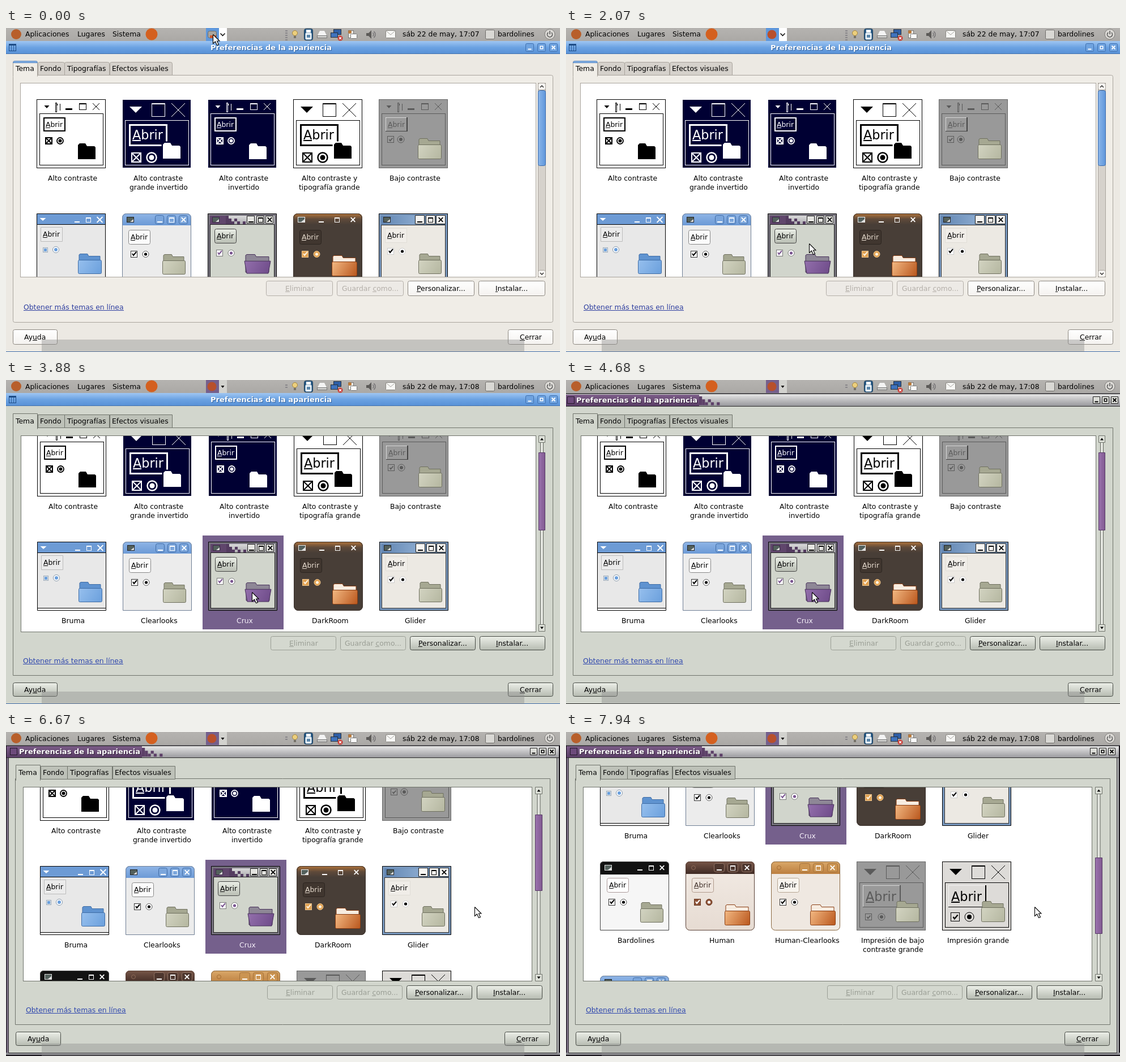
An HTML page with a canvas for the animation above (8 s loop, 978x573 px).

```html
<!DOCTYPE html>
<html lang="es">
<head>
<meta charset="utf-8">
<title>Preferencias de la apariencia</title>
<style>
html, body { margin: 0; width: 100%; height: 100%; overflow: hidden; background: #ece9e3; }
canvas { display: block; }
</style>
</head>
<body>
<canvas id="stage" width="978" height="573"></canvas>
<script>
const g = document.getElementById('stage').getContext('2d');
const LOOP = 8000;
// front, highlight, outline, back
const TAN = ['#b4b69f', '#d3d4c2', '#6f705f', '#a6a892'], BLUE = ['#6a9fdc', '#97c0ee', '#3f6da6', '#5f93d0'];
const ORANGE = ['#b9561c', '#f3b983', '#8a3d12', '#f7ece0'], PURPLE = ['#6d4a88', '#9470ad', '#47305a', '#8e8796'];

// ---- drawing helpers ----
const rect = (x, y, w, h, c) => { g.fillStyle = c; g.fillRect(x, y, w, h); };
const box = (x, y, w, h, c, lw = 1) => {
  g.strokeStyle = c; g.lineWidth = lw;
  g.strokeRect(x + lw / 2, y + lw / 2, w - lw, h - lw);
};
const trace = p => {
  g.beginPath();
  for (let i = 0; i < p.length; i += 2) g.lineTo(p[i], p[i + 1]);
};
const line = (c, lw, ...p) => { trace(p); g.strokeStyle = c; g.lineWidth = lw; g.stroke(); };
const poly = (c, ...p) => { trace(p); g.closePath(); g.fillStyle = c; g.fill(); };
const disc = (x, y, r, fill, edge, lw = 1) => {
  g.beginPath(); g.arc(x, y, r, 0, 7);
  if (fill) { g.fillStyle = fill; g.fill(); }
  if (edge) { g.strokeStyle = edge; g.lineWidth = lw; g.stroke(); }
};
const round = (x, y, w, h, r, fill, edge) => {
  g.beginPath(); g.roundRect(x + .5, y + .5, w - 1, h - 1, r);
  if (fill) { g.fillStyle = fill; g.fill(); }
  if (edge) { g.strokeStyle = edge; g.lineWidth = 1; g.stroke(); }
};
const fade = (x1, y1, x2, y2, ...cols) => {
  const f = g.createLinearGradient(x1, y1, x2, y2);
  cols.forEach((c, i) => f.addColorStop(i / (cols.length - 1), c));
  return f;
};
const down = (y, h, ...cols) => fade(0, y, 0, y + h, ...cols);
const tri = (x, y, w, h, c) => poly(c, x - w / 2, y, x + w / 2, y, x, y + h);
const cross = (x, y, r, c, lw = 1) => {
  line(c, lw, x - r, y - r, x + r, y + r);
  line(c, lw, x + r, y - r, x - r, y + r);
};
const tick = (x, y, c, k = 1) =>
  line(c, 2 * k, x - 3 * k, y, x - k, y + 3 * k, x + 4 * k, y - 3 * k);

// An underscore marks the underlined letter.
function text(s, x, y, c = '#000', { size = 12.4, align = 'left', bold = false } = {}) {
  const at = s.indexOf('_');
  s = s.replace('_', '');
  g.font = `${bold ? 'bold ' : ''}${size}px "DejaVu Sans", sans-serif`;
  const width = g.measureText(s).width;
  if (align === 'center') x -= width / 2;
  x = Math.round(x);
  y = Math.round(y);
  g.fillStyle = c;
  g.fillText(s, x, y);
  if (at >= 0) {
    const a = g.measureText(s.slice(0, at)).width, w = g.measureText(s[at]).width;
    g.fillRect(Math.round(x + a), y + 1, Math.round(w), size > 20 ? 2 : 1);
  }
}

// ---- theme previews (drawn at the tile's own corner) ----
function folder(x, y, w, h, tint) {
  const [low, high, edge, back] = tint, top = y + h * .3;
  g.beginPath();
  g.moveTo(x + 2, y + h - 2); g.lineTo(x + 2, y + 2); g.lineTo(x + 4, y + .5);
  g.lineTo(x + w * .4, y + .5); g.lineTo(x + w * .45, y + 4.5); g.lineTo(x + w - 3, y + 4.5);
  g.lineTo(x + w - 3, y + h - 2); g.closePath();
  g.fillStyle = back; g.fill();
  g.strokeStyle = edge; g.lineWidth = 1; g.stroke();
  const paint = fade(x, top, x + w, y + h, high, low);
  if (tint === PURPLE) {
    const p = [x, top + 2, x + w, top + 2, x + w - 4, y + h, x + 4, y + h, x, top + 2];
    poly(paint, ...p);
    line(edge, 1, ...p);
  } else round(x, Math.round(top), w, Math.round(y + h - top), 2, paint, edge);
}

function flatFolder(x, y, c, rim) {
  g.lineJoin = 'round';
  trace([x, y + 28, x, y + 3, x + 3, y, x + 13, y, x + 16, y + 5, x + 29, y + 5, x + 31, y + 7, x + 31, y + 28]);
  g.closePath();
  if (rim) { g.strokeStyle = rim; g.lineWidth = 5; g.stroke(); }
  g.fillStyle = c; g.fill();
  g.lineJoin = 'miter';
}

function bevel(x, y, w, h, dark) {
  rect(x, y, w, 1, '#fff9'); rect(x, y, 1, h, '#fff9');
  rect(x, y + h - 1, w, 1, dark); rect(x + w - 2, y, 2, h, dark);
}

function contrast(bg, fg, big, soft) {
  rect(0, 0, 122, 122, bg);
  box(0, 0, 122, 122, soft && fg !== '#000' ? '#666' : fg);
  if (big) {
    tri(24, 13, 22, 11, fg);
    box(52, 7, 24, 24, fg); rect(52, 7, 24, 2, fg);
    cross(99, 19, 12, fg);
    box(5, 37, 113, 80, fg);
    if (soft) bevel(11, 42, 67, 39, fg); else box(12, 44, 68, 39, fg, 3);
    text('_Abrir', soft ? 16 : 18, soft ? 70 : 71, fg, { size: 22.3 });
  } else {
    tri(18, 11, 9, 5, fg);
    box(33, 6, 3, 17, fg); rect(41, 8, 1, 12, fg); rect(36, 8, 1, 3, fg);
    rect(51, 16, 12, 3, fg);
    box(75, 7, 13, 12, fg); rect(75, 7, 13, 2, fg);
    cross(105, 13, 6, fg);
    box(5, 25, 113, 92, fg);
    if (soft) bevel(12, 32, 39, 25, '#444'); else box(12, 32, 39, 25, fg, 2);
    text('_Abrir', 16, 49, fg);
  }
  if (soft) {
    const n = fg === '#000' ? 16 : 12, cy = big ? 98 : 71, cx = !big ? 39 : n > 12 ? 48 : 44;
    box(15, cy - n / 2, n, n, fg);
    tick(15 + n / 2, cy, fg, n / 14);
    disc(cx, cy, n / 2, null, fg);
    disc(cx, cy, n / 4, fg);
    folder(69, big ? 70 : 69, 42, 37, TAN);
  } else {
    const n = big ? 18 : 13, x = big ? 16 : 15, y = big ? 94 : 67;
    box(x, y, n, n, fg, 2);
    cross(x + n / 2, y + n / 2, n / 2 - 2, fg, 2);
    const cx = big ? 52 : 41.5, cy = y + n / 2;
    disc(cx, cy, big ? 8.5 : 5.5, null, fg, big ? 2.5 : 1.8);
    disc(cx, cy, big ? 4.5 : 3, fg);
    if (big) flatFolder(72, 77, fg, bg); else flatFolder(73, 78, fg);
  }
}

function windowTile(o) {
  const { bar, body, edge, h = 20, r = 0, ink = '#000', mark = '#000' } = o;
  const corners = o.low ? r : [r, r, 0, 0];
  g.save();
  g.beginPath(); g.roundRect(0, 0, 122, 122, corners); g.clip();
  rect(0, 0, 122, 122, body);
  rect(0, 0, 122, h, bar);
  if (o.extra) o.extra();
  g.restore();
  round(0, 0, 122, 122, corners, null, edge);
  if (!o.bruma && !o.dot) {
    rect(8, 6, 13, 10, o.rim || '#222'); rect(9, 7, 11, 8, '#53605c');
    poly('#ddd', 20, 10, 20, 15, 14, 15);
  }
  if (o.bruma) tri(11, 8, 11, 5, '#fff');
  if (o.dot) disc(14, 11, 3.5, null, o.dot);
  const [cx, pitch, w, fill, rim, glyph] = o.ctl;
  for (let i = 0; i < 3; i++) {
    const x = Math.round(cx + pitch * i), y = 11, n = Math.min(16, w);
    if (w) round(Math.round(x - w / 2), y - n / 2, w, n, o.square ? 0 : 3, fill, rim);
    if (i === 0) rect(x - 4, y + 3, 9, 2, glyph);
    if (i === 1) { box(x - 4, y - 4, 9, 9, glyph); rect(x - 4, y - 4, 9, 2, glyph); }
    if (i === 2) cross(x + .5, y, o.bruma ? 5 : 3.8, glyph, 1.8);
  }
  const bx = o.bx || 11, by = o.by || 29;
  round(bx, by, 39, 26, o.flat ? 0 : 3, o.btn, o.btnEdge);
  text('_Abrir', bx + 4, by + 17, ink);
  const cy = o.cy || 72;
  if (o.bruma) {
    box(11, 60, 9, 9, '#9ab'); rect(13, 62, 5, 5, BLUE[0]);
    disc(34, 64, 5.5, '#fff', '#89a'); disc(34, 64, 3, BLUE[0]);
  } else {
    rect(15, cy - 6, 12, 12, o.well || '#fff');
    box(15, cy - 6, 12, 12, o.box || '#333');
    tick(21, cy - 1, mark);
    disc(41.5, cy, 5.5, o.well || '#fff', o.box || '#555');
    disc(41.5, cy, 2.6, mark);
  }
  folder(...(o.at || [71, 72, 41, 36]), o.folder || TAN);
}

// Loose blocks that trail off a solid bar.
const steps = (x, y, k, c) =>
  [[0, 0, 3], [1, 1, 2], [2, 2, 1], [3, 1, 1], [4, 2, 1], [6, 2, 1]]
    .forEach(([a, b, n]) => rect(x + a * k, y + b * k, k, n * k, c));

const blueLook = () => windowTile({ bar: down(0, 21, '#8fb5e6', '#6c9ad6'), body: '#ececec', edge: '#6f7f95', h: 21,
  r: 7, ctl: [65.5, 21, 16, '#7ba6dc', '#416ca6', '#fff'], btn: '#fbfbfb', btnEdge: '#888' });

const tiles = [
  [['Alto contraste'], () => contrast('#fff', '#000')],
  [['Alto contraste', 'grande invertido'], () => contrast('#000033', '#fff', true)],
  [['Alto contraste', 'invertido'], () => contrast('#000033', '#fff')],
  [['Alto contraste y', 'tipografía grande'], () => contrast('#fff', '#000', true)],
  [['Bajo contraste'], () => contrast('#999', '#5a5a5a', false, true)],
  [['Bruma'], () => windowTile({ bar: '#6d9bd5', body: '#e8e8e8', edge: '#000', h: 19, bruma: true,
    ctl: [71, 20, 0, 0, 0, '#fff'], btn: '#ebebeb', btnEdge: '#bbb', flat: true, bx: 7, by: 24,
    folder: BLUE, at: [73, 71, 42, 36],
    extra() { rect(0, 19, 122, 1, '#000'); rect(0, 117, 122, 1, '#000'); rect(1, 118, 120, 3, '#fff'); } })],
  [['Clearlooks'], blueLook],
  [['Crux'], () => windowTile({ bar: down(0, 20, '#e6e6e6', '#a9a9ac'), body: '#d1d5cc',
    edge: '#000', square: true, rim: '#3a2a45', ctl: [76, 16.5, 14, '#e4e4e0', '#222', '#000'],
    btn: down(29, 26, '#e7ebe3', '#b4b9ae'), btnEdge: '#444', mark: '#7a5590', box: '#777', cy: 70, bx: 12, by: 27,
    folder: PURPLE, at: [65, 72, 46, 34],
    extra() {
      rect(0, 0, 32, 20, '#60466c'); steps(32, 4, 5, '#543c60');
      box(1, 1, 120, 120, '#75727c', 3); box(4, 19, 114, 99, '#222');
    } })],
  [['DarkRoom'], () => windowTile({ bar: down(0, 20, '#b0733a', '#5f4a3a', '#483e37'), body: '#483e37',
    edge: '#3a302a', r: 8, low: true, ctl: [49, 28, 0, 0, 0, '#fff'], rim: '#eee', btn: '#40362f',
    btnEdge: '#2c2520', ink: '#e8ddd0', well: '#e0a050', box: '#f0c890', mark: '#fff3df',
    folder: ORANGE, at: [68, 74, 45, 37] })],
  [['Glider'], () => windowTile({ bar: fade(0, 0, 122, 0, '#5f83b0', '#86a6cc', '#3d5874'), body: '#ece9e3',
    edge: '#000', square: true, ctl: [72, 18.5, 17, '#f6f5f2', '#222', '#000'], btn: '#f0ede8', btnEdge: '#e0ddd6',
    flat: true, box: '#ccc', by: 26, cy: 67, at: [70, 71, 41, 36],
    extra() { box(1, 1, 120, 120, '#7897bd', 3); box(4, 20, 114, 98, '#333'); } })],
  [['Bardolines'], () => windowTile({ bar: '#121212', body: '#f6f6f6', edge: '#444', h: 23, r: 6, rim: '#ddd',
    ctl: [70, 19.5, 0, 0, 0, '#fff'], btn: '#fff', btnEdge: '#a99', bx: 12 })],
  [['Human'], () => windowTile({ bar: down(0, 22, '#775648', '#3f2a24'), body: down(22, 100, '#f0e8e1', '#e6dbd2'),
    edge: '#5b4238', h: 22, r: 7, low: true, dot: '#8d6a58', ctl: [58.5, 24.5, 19, '#4d362e', '#947565', '#fff'],
    btn: '#efe6df', btnEdge: '#b09a8c', ink: '#40302a', well: '#8d5236', box: '#6a3a24', mark: '#fff',
    folder: ORANGE, at: [69, 76, 45, 37] })],
  [['Human-Clearlooks'], () => windowTile({ bar: down(0, 22, '#daa869', '#bc7f40'), body: '#efe8e1',
    edge: '#8a6842', h: 22, r: 7, low: true, dot: '#a56c32', ctl: [58.5, 24.5, 19, '#cb9452', '#a4713a', '#fff'],
    btn: '#f8f4ee', btnEdge: '#b5a592', folder: ORANGE, at: [69, 76, 45, 37] })],
  [['Impresión de bajo', 'contraste grande'], () => contrast('#999', '#5a5a5a', true, true)],
  [['Impresión grande'], () => contrast('#dddbd8', '#000', true, true)],
  [[], blueLook],
];
const ROWS = [0, 202, 387, 589];

// ---- window layouts ----
const soft = {
  body: '#ece9e3', pane: '#f0ede7', edge: '#a9a49d', tabOff: '#d5d1cb', dim: '#b3aea8', link: '#2f3fa0',
  pick: '#86abd9', bar: ['#8db7ea', '#5d95da'], trough: '#d6d2cc', r: 3,
  tab: [12, 58], note: [12, 83, 954, 438], list: [25, 97, 911, 344], at: [54, 126],
  scroll: [939, 97, 14, 344], slide: [.41, 134], btn: [459, 447, 118, 27, 125], url: [31, 498],
  foot: [12, 533, 79, 27, 886],
};
const crux = {
  body: '#d2d6cd', pane: '#d2d6cd', edge: '#6f736b', tabOff: '#bdc1b8', dim: '#9a9e95', link: '#3048ae',
  pick: '#75608c', bar: ['#9c74b0', '#80598f'], trough: '#d2d6cd', r: 0,
  tab: [12, 59], note: [12, 84, 954, 439], list: [26, 98, 910, 348], at: [55, 128],
  scroll: [940, 98, 12, 347], slide: [.41, 138], btn: [467, 453, 116, 25, 123], url: [30, 501],
  foot: [12, 535, 79, 25, 886],
};
const framed = { ...crux,
  tab: [17, 58], note: [16, 82, 945, 436], list: [30, 97, 899, 344], at: [60, 127],
  scroll: [934, 97, 13, 344], slide: [.394, 135], btn: [461, 448, 116, 25, 123.2], url: [35, 496],
  foot: [17, 530, 80, 25, 880],
};

function button(s, x, y, w, h, k, off) {
  x = Math.round(x);
  const fill = k === soft ? (off ? '#edeae6' : down(y, h, '#fff', '#f4f2ef'))
    : off ? '#d4d8cf' : down(y, h, '#edf0e9', '#b5bab0');
  round(x, y, w, h, 3, fill, off ? k.dim : k === soft ? '#8c8780' : '#454943');
  text(s, x + w / 2, y + h / 2 + 4.5, off ? k.dim : '#000', { align: 'center' });
}

function tabs(k) {
  const [x, y] = k.tab;
  const cell = (s, a, w, tx, on) => {
    round(x + a, y + (on ? 0 : 2), w, on ? 28 : 24, [k.r, k.r, 0, 0], on ? k.pane : k.tabOff, k.edge);
    if (on) {
      rect(x + a + 1, y + 25, w - 2, 4, k.pane);
      if (k === soft) round(x + a, y, w, 4, [3, 3, 0, 0], '#86b2e6', '#5585c0');
    }
    text(s, x + tx, y + 18);
  };
  cell('Fondo', 44, 48, 48);
  cell('Tipografías', 91, 80, 96);
  cell('Efectos visuales', 171, 111, 175);
  cell('Tema', 0, 44, 5, true);
}

function scrollbar(k, s) {
  const [x, y, w, h] = k.scroll, sy = Math.round(110 + s * k.slide[0]), mx = x + w / 2;
  rect(x, y, w, h, k.trough);
  if (k === soft) box(x, y, w, h, k.edge);
  else { rect(mx - 3, y + 13, 6, h - 26, '#5f635c'); rect(mx - 2, y + 13, 4, h - 26, '#e6e8e2'); }
  round(x, sy, w, k.slide[1], k.r, fade(x, 0, x + w, 0, ...k.bar), k === soft ? '#3d6cab' : '#573a66');
  for (const [top, d] of [[y, -1], [y + h - 13, 1]]) {
    round(x, top, w, 13, k.r, k === soft ? '#f7f5f2' : '#dde0d8', k.edge);
    const cy = top + 6.5;
    if (k === soft) line('#333', 1.5, mx - 3, cy - d * 1.5, mx, cy + d * 1.5, mx + 3, cy - d * 1.5);
    else tri(mx, cy - d * 2, 6, d * 4, '#000');
  }
}

function list(k, s, picked) {
  const [x, y, w, h] = k.list;
  rect(x, y, w, h, '#fff');
  g.save();
  g.beginPath(); g.rect(x + 1, y + 1, w - 2, h - 2); g.clip();
  tiles.forEach(([label, draw], i) => {
    const on = picked && i === 7;
    g.save();
    g.translate(k.at[0] + i % 5 * 151, k.at[1] + ROWS[Math.floor(i / 5)] - s);
    if (on) rect(-10, -11, 143, 166, k.pick);
    draw();
    label.forEach((t, n) => text(t, 64, 144 + n * 16, on ? '#f4eef8' : '#000', { align: 'center' }));
    g.restore();
  });
  g.restore();
  box(x, y, w, h, k.edge);
}

function dialog(k, s, picked) {
  rect(0, 44, 978, 529, k.body);
  const [nx, ny, nw, nh] = k.note;
  round(nx, ny, nw, nh, k.r, k.pane, k.edge);
  tabs(k);
  list(k, s, picked);
  scrollbar(k, s);
  const [bx, by, bw, bh, pitch] = k.btn;
  ['_Eliminar', 'Guardar _como...', '_Personalizar...', '_Instalar...']
    .forEach((t, i) => button(t, bx + i * pitch, by, bw, bh, k, i < 2));
  const link = 'Obtener más temas en línea', [ux, uy] = k.url;
  text(link, ux, uy, k.link);
  rect(ux, uy + 1, Math.round(g.measureText(link).width), 1, k.link);
  const [fx, fy, fw, fh, cx] = k.foot;
  button('Ay_uda', fx, fy, fw, fh, k);
  button('_Cerrar', cx, fy, 80, fh, k);
}

function controls(x, pitch, y, n, r, fill, rim, glyph) {
  for (let i = 0; i < 3; i++) {
    const a = x + pitch * i, c = a + n / 2, m = y + n / 2;
    round(a, y, n, n, r, fill, rim);
    if (i === 0) rect(c - 3, m + 2, 6, 2, glyph);
    if (i === 1) box(c - 3, m - 3, 6, 6, glyph, 1.5);
    if (i === 2) cross(c, m, 3, glyph, 1.8);
  }
}

function titleBar(dark, inset) {
  const name = 'Preferencias de la apariencia';
  if (!dark) {
    rect(0, 23, 978, 23, down(23, 23, '#9fc6f2', '#6ba2e2', '#5790d6'));
    rect(0, 45, 978, 1, '#4472ae');
    box(5, 28, 13, 13, '#1d4c86'); rect(6, 29, 11, 2, '#1d4c86');
    rect(9, 31, 1, 9, '#2f639f'); rect(13, 31, 1, 9, '#2f639f');
    text(name, 469, 40, '#31619d', { size: 13, align: 'center', bold: true });
    text(name, 468, 39, '#fff', { size: 13, align: 'center', bold: true });
    controls(917, 21, 27, 15, 2, '#6fa3e0', '#3f6fae', '#fff');
    rect(0, 572, 978, 1, '#3f6cab');
    return;
  }
  const d = inset ? 5 : 0, y = inset ? 24 : 25;
  rect(0, 24, 978, 22, down(24, 22, '#eaeaea', '#c0c0c2', '#98989c'));
  rect(0, y + 1, 235 + d, 20, down(y, 21, '#7d5e89', '#5a3d66'));
  steps(235 + d, y + 4, 5.2, '#5d4068');
  rect(0, 24, 978, 1, '#222');
  rect(0, y + 21, 978, 1, '#2a2a2a');
  box(d + 2, y + 4, 13, 13, '#24162a'); rect(d + 3, y + 5, 11, 11, '#6d4a7b');
  text(name, d + 19, y + 16, '#2c1a33', { size: 13, bold: true });
  text(name, d + 18, y + 15, '#fff', { size: 13, bold: true });
  controls(930 - d, 16, y + 4, 13, 0, '#dcddd8', '#222', '#000');
  if (inset) {
    rect(0, 46, 5, 527, '#74687c'); rect(0, 24, 1, 549, '#17131a'); rect(4, 46, 1, 522, '#3a353d');
    rect(972, 46, 6, 527, '#a9abac'); rect(972, 46, 1, 522, '#3a353d'); rect(976, 24, 2, 549, '#17131a');
    rect(0, 567, 978, 6, '#8d8d92'); rect(4, 567, 969, 1, '#333'); rect(0, 571, 978, 2, '#17131a');
  } else rect(0, 572, 978, 1, '#222');
}

function panel(t, dark) {
  rect(0, 0, 978, 24, down(0, 24, '#b5b3b0', '#aaa8a5'));
  rect(0, 23, 978, 1, '#77757a');
  const y = dark ? 16 : 15;
  disc(18, 11, 9, '#b85f2b');
  text('Aplicaciones', 34, y);
  text('Lugares', 126, y);
  text('Sistema', 188, y);
  disc(257, 11, 10.5, '#d4601f');

  rect(353, 0, 23, 23, dark ? '#75608c' : '#5f98dc');
  if (t < 160) {
    round(356, 5, 16, 13, 3, '#a9a59e', '#6d6a66');
    rect(360, 13, 11, 5, '#c9572c');
  } else disc(363.5, 11.5, 8, '#b8502c');
  rect(376, 0, 14, 23, dark ? '#d2d2ce' : '#fff');
  if (dark) tri(382.5, 10, 6, 4, '#000');
  else line('#111', 1.6, 378.5, 9.5, 382.5, 13.5, 386.5, 9.5);

  for (let i = 0; i < (dark ? 2 : 5); i++) rect(493, (dark ? 8 : 4) + i * 4, 4, 2, '#88868a');
  disc(510, 9, 4.5, '#eccf7d', '#a48640'); rect(508, 14, 4, 4, '#77736a');
  round(526, 1, 16, 21, 3, '#2c5c86', '#173b59'); round(528, 8, 12, 13, 2, '#eef5fa'); rect(530, 3, 8, 5, '#fff');
  rect(531, 12, 6, 5, '#5c87ab');
  poly('#f4f4f4', 550, 13, 554, 5, 562, 5, 566, 13); rect(549, 13, 18, 5, '#cfcfcd'); box(549, 13, 18, 5, '#777');
  rect(578, 2, 14, 10, '#2f5fa6'); box(578, 2, 14, 10, '#26303c');
  rect(573, 8, 13, 9, '#3f73bd'); box(573, 8, 13, 9, '#26303c');
  disc(590, 18, 4.5, '#c83a34'); cross(590, 18, 2, '#fff', 1.3);
  rect(604, 4, 10, 14, '#e8e8e4'); box(604, 4, 10, 14, '#777');
  round(608, 10, 12, 9, 1, '#fafafa', '#777'); disc(607, 7, 3, '#b9793a');
  poly('#5c5a58', 636, 9, 640, 9, 645, 4, 645, 19, 640, 14, 636, 14);
  for (const r of [4, 7]) {
    g.beginPath(); g.arc(645, 11.5, r, -.9, .9);
    g.strokeStyle = '#6b696c'; g.lineWidth = 1.2; g.stroke();
  }
  round(670, 4, 18, 14, 1, '#f7f7f5', '#8a8883'); line('#a5a39d', 1, 671, 5, 679, 12, 687, 5);
  text('sáb 22 de may, 17:0' + (dark ? 8 : 7), 700, y);
  round(846, 3, 17, 17, 2, '#d9d8d4', '#6e6c69');
  text('bardolines', 868, y);
  disc(960, 11, 9, '#d9d7d3', '#7e7c79');
  g.beginPath(); g.arc(960, 11.5, 4.5, -.9, 4.04);
  g.strokeStyle = '#555'; g.lineWidth = 1.5; g.stroke();
  rect(959.3, 5, 1.5, 6, '#555');
}

// ---- motion ----
const path = [
  [0, 366, 12], [160, 366, 12], [280, 362, 19], [790, 362, 19], [830, 545, 28], [1030, 545, 28],
  [1130, 440, 8], [1230, 356, 44], [1330, 324, 90], [1580, 352, 250], [1830, 394, 371],
  [1990, 433, 384], [2110, 429, 381], [3090, 429, 381], [3180, 435, 376], [4930, 435, 376],
  [5160, 610, 358], [5400, 769, 333], [5680, 824, 310], [5760, 824, 310], [5800, 828, 310],
  [5960, 828, 310], [5980, 826, 310], [6000, 828, 310], [LOOP, 828, 310],
];
const stops = [[2870, 44], [6670, 92], [6970, 140], [7230, 188], [7850, 237], [7940, 285]];

function cursor(t) {
  const i = path.findIndex(p => p[0] > t), [a, x, y] = path[i - 1], [b, u, v] = path[i], f = (t - a) / (b - a);
  g.save();
  g.translate(Math.round(x + (u - x) * f) - .5, Math.round(y + (v - y) * f) - .5);
  const p = [0, 0, 0, 16, 4, 12.5, 7, 19, 10, 18, 7, 11.5, 11.5, 11.5, 0, 0];
  poly('#fff', ...p);
  line('#000', 1.1, ...p);
  g.restore();
}

function paint(t) {
  const s = stops.reduce((v, [at, to]) => t >= at ? to : v, 0);
  const dark = t >= 3550, inset = t >= 4930;
  dialog(inset ? framed : dark ? crux : soft, s, t >= 3180);
  panel(t, dark);
  titleBar(t >= 4020, inset);
  rect(63, 551, 852, 22, 'rgba(140,140,140,.42)');
  cursor(t);
}

const start = performance.now();
function loop() {
  paint((performance.now() - start) % LOOP);
  requestAnimationFrame(loop);
}
loop();
</script>
</body>
</html>
```
